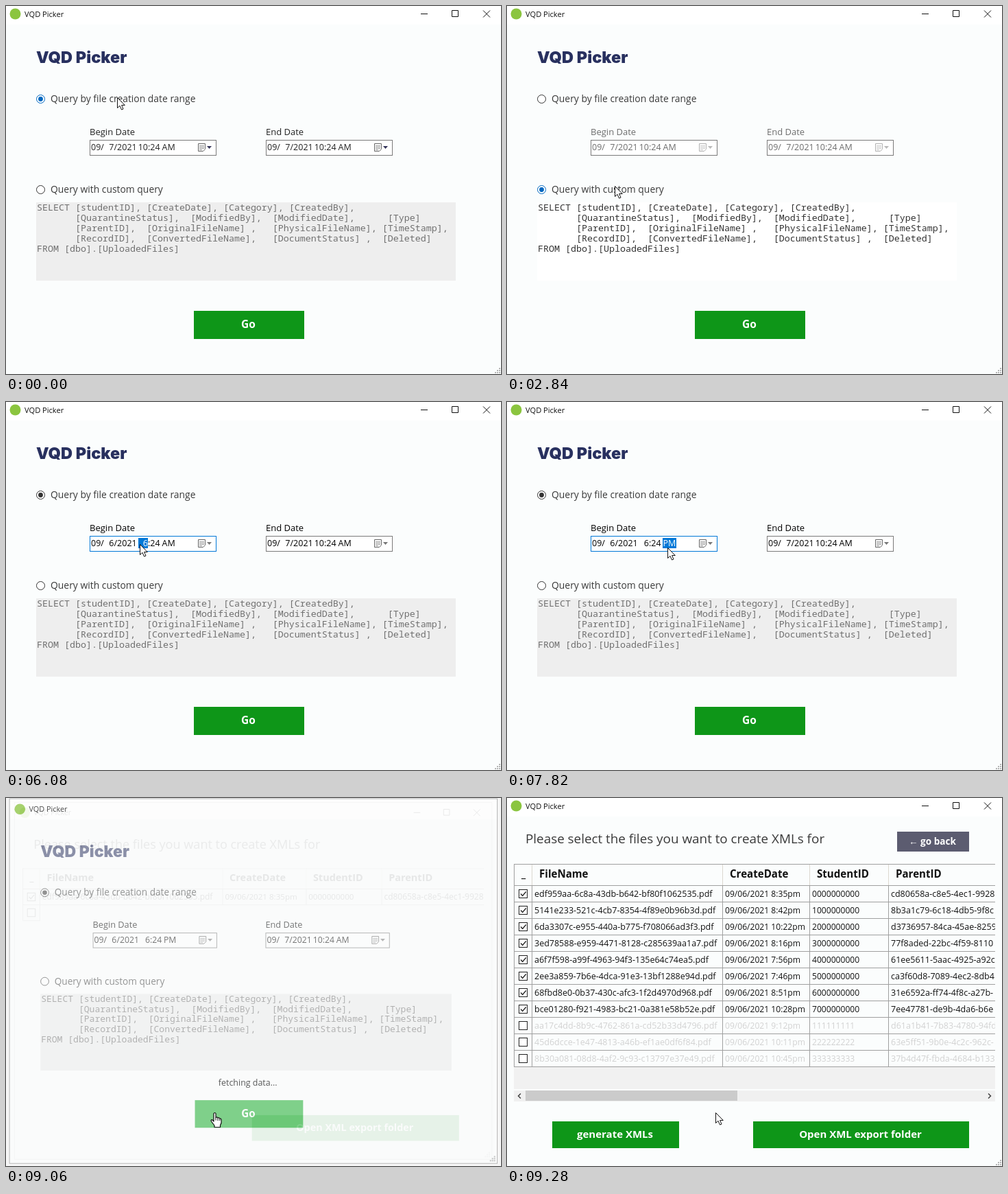
Recreate the animation shown at these times as an HTML page. Size 722 by 536 pixels, loop 9.3 s.

```html
<!DOCTYPE html>
<html lang="en">
<head>
<meta charset="utf-8">
<title>VQD Picker</title>
<style>
html, body { margin: 0; width: 100%; height: 100%; overflow: hidden; background: #f6f6f6; }
svg { display: block; width: 722px; height: 536px; font-family: "Open Sans", "Noto Sans", sans-serif; }
text { white-space: pre; }
.bold { font-weight: 700; }
.medium { font-weight: 500; }
.mono { font: 13.333px "Noto Sans Mono", "DejaVu Sans Mono", monospace; }
.brand { font: 900 23.5px Inter, "Open Sans", sans-serif; }
</style>
</head>
<body>
<svg id="stage" viewBox="0 0 722 536"></svg>
<script>
const LOOP = 9300;
const GREEN = '#0e9618', HOVER_GREEN = '#0fac22', BLUE = '#0078d7';
const NAME = 'VQD Picker';

const text = (x, y, size, str, extra = '') =>
  `<text x="${x}" y="${y}" font-size="${size}" ${extra}>${str}</text>`;
const box = (x, y, w, h, fill, extra = '') =>
  `<rect x="${x}" y="${y}" width="${w}" height="${h}" fill="${fill}" ${extra}/>`;
const path = (d, color, extra = '') =>
  `<path d="${d}" fill="none" stroke="${color}" ${extra}/>`;
const button = (x, y, w, h, label, fill = GREEN, size = 15, id = '') =>
  box(x, y, w, h, fill, id) +
  text(x + w / 2 - 1, y + h / 2 + 4.5, size, label, 'class="bold" fill="#fff" text-anchor="middle"');

function windowFrame(id) {
  let grip = '';
  for (let r = 0; r < 3; r++)
    for (let c = 0; c <= r; c++) grip += box(719 - c * 3, 527 + r * 3, 2, 2, '#b4b4b4');
  return box(-2, -4, 726, 542, '#fbfdfd', 'stroke="#a8a8a8"') +
    box(-1, -3, 724, 30, '#fff') +
    '<circle cx="13.5" cy="11.5" r="8" fill="#8bc53f"/>' +
    text(27, 15.5, 11.1, NAME, 'fill="#111"') +
    path('M605 11.5h10M650.5 6.5h9v9h-9zM696 6.5l10 10M706 6.5l-10 10', '#111', `id="${id}Buttons"`) + grip;
}

const radio = (id, y, label) =>
  `<circle id="${id}Ring" cx="50.5" cy="${y}" r="6" fill="#fff"/>
   <circle id="${id}Dot" cx="50.5" cy="${y}" r="3.4"/>` +
  text(65, y + 4.5, 13.9, label, 'class="medium" fill="#3a3a3a"');

function picker(id, x, label) {
  const dx = n => x + n;
  const seg = (name, at, str, end) =>
    text(dx(at), 210, 12.5, str, `id="${id}${name}" ${end ? 'text-anchor="end"' : ''}`);
  return `<g id="${id}">` + text(x, 188, 13, label) +
    box(dx(.5), 195.5, 184, 22, '#fff', `id="${id}Border"`) +
    box(0, 198, 0, 15, BLUE, `id="${id}Mark"`) +
    seg('Month', 2, '09/') + seg('Day', 35.5, '7', true) + seg('Year', 35.5, '/2021') +
    seg('Hour', 85, '10', true) + seg('Minute', 85, ':24') + seg('Half', 105.5, 'AM') +
    `<g id="${id}Icon">` +
    path(`M${dx(158.5)} 200.5h10v8l-3 3h-7z`, '#666') +
    path(`M${dx(160)} 203.5h7M${dx(160)} 205.5h7M${dx(160)} 207.5h7M${dx(160)} 209.5h4`, '#999') +
    `<path id="${id}Arrow" d="M${dx(171)} 204h7l-3.5 4z"/></g></g>`;
}

const QUERY = [
  'SELECT [studentID], [CreateDate], [Category], [CreatedBy],',
  '       [QuarantineStatus],  [ModifiedBy],  [ModifiedDate],      [Type]',
  '       [ParentID],  [OriginalFileName] ,   [PhysicalFileName], [TimeStamp],',
  '       [RecordID],  [ConvertedFileName],   [DocumentStatus] ,  [Deleted]',
  'FROM [dbo].[UploadedFiles]'
];

const formWindow = () => '<g id="form">' + windowFrame('form') +
  '<g id="formBody">' +
  text(44, 83, 23.5, NAME, 'class="brand" fill="#28305f"') +
  radio('range', 135.5, 'Query by file creation date range') +
  picker('begin', 122, 'Begin Date') + picker('end', 379, 'End Date') +
  radio('custom', 267.5, 'Query with custom query') +
  box(44, 286, 612, 114, '#eee', 'id="queryBox"') +
  '<g id="query" class="mono">' +
  QUERY.map((line, i) => `<text x="45" y="${298 + i * 15}" xml:space="preserve">${line}</text>`).join('') + '</g>' +
  button(274, 444, 161, 41, 'Go', GREEN, 15.5, 'id="go"') + '</g>' +
  text(309, 422, 12.7, 'fetching data...', 'id="fetching" fill="#222"') + '</g>';

const ROWS = `edf959aa-6c8a-43db-b642-bf80f1062535 8:35 cd80658a-c8e5-4ec1-9928
5141e233-521c-4cb7-8354-4f89e0b96b3d 8:42 8b3a1c79-6c18-4db5-9f8c
6da3307c-e955-440a-b775-f708066ad3f3 10:22 d3736957-84ca-45ae-8259
3ed78588-e959-4471-8128-c285639aa1a7 8:16 77f8aded-22bc-4f59-8110
a6f7f598-a99f-4963-94f3-135e64c74ea5 7:56 61ee5611-5aac-4925-a92c
2ee3a859-7b6e-4dca-91e3-13bf1288e94d 7:46 ca3f60d8-7089-4ec2-8db4
68fbd8e0-0b37-430c-afc3-1f2d4970d968 8:51 31e6592a-ff74-4f8c-a27b-
bce01280-f921-4983-bc21-0a381e58b52e 10:28 7ee47781-de9b-4da6-b6e
aa17c4dd-8b9c-4762-861a-cd52b33d4796 9:12 d61a1b41-7b83-4780-94fd
45d6dcce-1e47-4813-a46b-ef1ae0df6f84 10:11 63e5ff51-9b0e-4c2c-962c-
8b30a081-08d8-4af2-9c93-c13797e37e49 10:45 37b4d47f-fbda-4684-b133`.split('\n');

const checkbox = (y, on) => box(17.5, y + 6.5, 12, 12, '#fff', 'stroke="#222"') +
  (on ? path(`M20 ${y + 12.5}l2.7 3 5-6`, '#222', 'stroke-width="1.3"') : '');

function tableRow(line, i) {
  const [file, time, parent] = line.split(' ');
  const y = 127 + i * 24, on = i < 8, base = y + 17;
  const student = on ? i + '000000000' : String(i - 7).repeat(9);
  return `<g class="row" fill="${on ? '#111' : '#d2d2d2'}">` +
    path(`M10 ${y + 24.5}H712M10.5 ${y}v24M36.5 ${y}v24M314.5 ${y}v24M441.5 ${y}v24M556.5 ${y}v24`, '#a0a0a0') +
    checkbox(y, on) +
    text(40, base, 12.5, file + '.pdf') +
    text(318, base, 12.1, `09/06/2021 ${time}pm`) +
    text(445, base, 12.1, student) +
    text(560, base, 12.5, parent) + '</g>';
}

const listWindow = () => '<g id="list">' + windowFrame('list') +
  text(27, 66, 18.85, 'Please select the files you want to create XMLs for', 'class="medium" fill="#3a3a3a"') +
  '<g clip-path="url(#grid)">' +
  path('M10 96.5H712M10 127.5H712M10.5 96v31', '#a0a0a0') +
  path('M36.5 97v30M314.5 97v30M441.5 97v30M556.5 97v30', '#dcd8d0') +
  [[21, '_'], [47, 'FileName'], [325, 'CreateDate'], [452, 'StudentID'], [567, 'ParentID']]
    .map(([x, s]) => text(x, 116, 15.1, s, 'class="bold" fill="#111"')).join('') +
  ROWS.map(tableRow).join('') +
  '<g id="blank">' + path('M10.5 0v24.5h26V0', '#a0a0a0') + checkbox(0, false) + '</g></g>' +
  path('M10.5 390v33.5H712V390', '#e6e6e6', 'id="gridEdge"') +
  '<g id="loaded">' + box(10, 392, 702, 32, '#f1f1f1') +
  box(10, 426, 702, 16, '#f0f0f0') + box(27, 426, 309, 15, '#cbcbcb') +
  path('M20 430.5l-3.5 3.5 3.5 3.5M702 430.5l3.5 3.5-3.5 3.5', '#444', 'stroke-width="1.5"') +
  button(66, 471, 185, 39, 'generate XMLs') +
  button(569, 49, 105, 29, '← go back', '#5c5c70', 13.6) + '</g>' +
  button(359, 471, 315, 39, 'Open XML export folder') + '</g>';

const stage = document.getElementById('stage');
stage.innerHTML = '<defs><clipPath id="grid"><rect x="10" y="96" width="702" height="330"/></clipPath></defs>' +
  formWindow() + listWindow() +
  `<g id="cursor" stroke="#111" fill="#fff" stroke-linejoin="round">
    <path id="pointer" d="M.5 .5V15.5L4 12.3 6.5 18 9 17 6.6 11.5H11.3Z"/>
    <path id="hand" stroke-width="1.2" d="M-1 1.5Q.5-.5 2 1.5V7.5Q4 6 5 8 7 7 7.8 9 10 8.5 10 10.5V15Q9.5 17 8.5 18.5V21.5H0V19L-4.5 13Q-5.5 10.5-3.5 10.5L-1 13Z"/>
    <path id="fingers" d="M2 7.5v4M5 8v4M7.8 9v3"/>
  </g>`;

const el = {};
stage.querySelectorAll('[id]').forEach(node => el[node.id] = node);
const rows = [...stage.querySelectorAll('.row')];

const set = (id, attrs) => { for (const k in attrs) el[id].setAttribute(k, attrs[k]); };
const show = (node, on) => node.setAttribute('visibility', on ? 'visible' : 'hidden');
const smooth = p => p * p * (3 - 2 * p);

// Each step is [time, value, ...]; values blend between neighbouring steps.
function track(steps, t, ease = p => p) {
  if (t <= steps[0][0]) return steps[0].slice(1);
  for (let i = 1; i < steps.length; i++) {
    const a = steps[i - 1], b = steps[i];
    if (t < b[0]) {
      const p = ease((t - a[0]) / (b[0] - a[0]));
      return a.slice(1).map((v, k) => v + (b[k + 1] - v) * p);
    }
  }
  return steps[steps.length - 1].slice(1);
}

const MOVES = [
  [700, 162, 133], [1360, 157, 262], [2820, 157, 262], [3300, 173, 165], [3700, 165, 122],
  [3760, 165, 122], [3780, 165, 130], [4120, 165, 130], [4520, 162, 203], [4840, 152, 207],
  [5380, 152, 207], [5860, 195, 207], [6240, 195, 207], [6460, 229, 208], [6700, 229, 208],
  [6960, 234, 207], [7800, 234, 207], [7820, 234, 212], [8700, 304, 458]
];
const FORM = [[9000, 1, 1], [9020, .96, 1], [9060, .8, .98], [9140, .33, .956], [9200, 0, .94]];
const LIST = [[9040, 0, .95], [9060, .08, .959], [9140, .62, .983], [9200, .92, .996], [9240, 1, 1]];

function drawRadio(id, on, hover) {
  const color = hover ? '#0067c0' : '#333';
  set(id + 'Ring', { stroke: color });
  set(id + 'Dot', { fill: color });
  show(el[id + 'Dot'], on);
}

function drawPicker(id, { custom, touched, hover, focus }) {
  const ink = custom ? '#6d6d6d' : touched ? '#000' : '#222';
  set(id, { fill: ink });
  set(id + 'Border', { stroke: focus ? BLUE : hover ? '#000' : '#7a7a7a' });
  set(id + 'Icon', { opacity: custom ? .5 : 1 });
  set(id + 'Arrow', { fill: touched ? '#777' : '#35355a' });
}

function drawSelection(t) {
  const part = t < 5140 ? '' : t < 5860 ? 'Day' : t < 6700 ? 'Hour' : t < 8740 ? 'Half' : '';
  const [x, w] = { Day: [143, 15], Hour: [193, 14], Half: [227, 20] }[part] || [0, 0];
  set('beginMark', { x, width: w });
  for (const name of ['Day', 'Hour', 'Half'])
    set('begin' + name, { fill: name === part ? '#fff' : 'inherit' });
  el.beginDay.textContent = t < 5300 ? '7' : '6';
  el.beginHour.textContent = t < 6080 ? '10' : '6';
  el.beginHalf.textContent = t < 7160 ? 'AM' : 'PM';
}

function place(id, [alpha, scale]) {
  set(id, { opacity: alpha, transform: `translate(352 250) scale(${scale}) translate(-352 -250)` });
}

function draw(t) {
  const [x, y] = track(MOVES, t, smooth);
  const over = (x0, y0, x1, y1) => x >= x0 && x < x1 && y >= y0 && y < y1;
  const custom = t >= 1760 && t < 3780, touched = t >= 1760;

  drawRadio('range', !custom, over(44, 126, 277, 145));
  drawRadio('custom', custom, over(44, 258, 230, 277));
  drawPicker('begin', { custom, touched, hover: !custom && over(122, 195, 307, 218), focus: t >= 5140 && t < 8740 });
  drawPicker('end', { custom, touched });
  drawSelection(t);
  set('queryBox', { fill: custom ? '#fff' : '#eee' });
  set('query', { fill: custom ? '#333' : '#707070' });

  const onGo = over(274, 444, 435, 485);
  set('go', { fill: onGo ? HOVER_GREEN : GREEN });
  set('formBody', { opacity: t < 8760 ? 1 : .7 });
  show(el.fetching, t >= 8740);
  show(el.formButtons, t < 9020);

  place('form', track(FORM, t));
  place('list', track(LIST, t));
  const count = Math.max(0, Math.min(11, 1 + Math.floor((t - 9060) / 10)));
  rows.forEach((row, i) => show(row, i < count));
  set('blank', { transform: `translate(0 ${127 + count * 24})` });
  show(el.blank, count < 11);
  show(el.loaded, t >= 9180);
  show(el.gridEdge, t >= 9100 && t < 9180);

  const hand = onGo && t < 9200;
  set('cursor', { transform: `translate(${Math.round(x)} ${Math.round(y)})` });
  show(el.pointer, !hand);
  show(el.hand, hand);
  show(el.fingers, hand);
}

const start = performance.now();
function tick() {
  // The picture advances in steps of 20 ms.
  const t = (performance.now() - start) % LOOP;
  draw(Math.floor(t / 20) * 20);
  requestAnimationFrame(tick);
}
tick();
</script>
</body>
</html>
```
